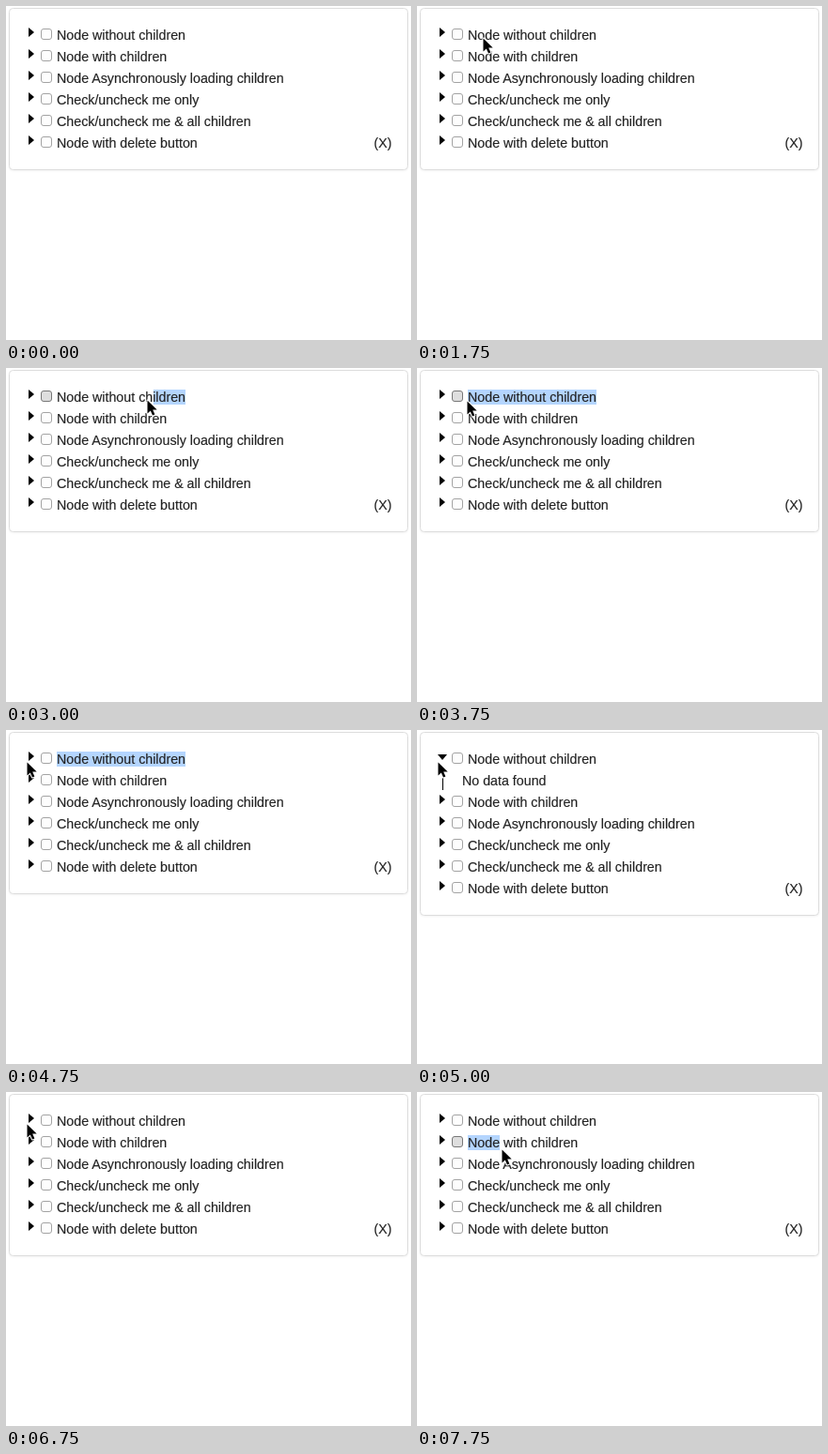
These frames come from a looping animation (431x356 px, 8000 ms). An HTML page:

```html
<!DOCTYPE html>
<html lang="en">
<head>
<meta charset="utf-8">
<title>Tree view</title>
<style>
  html, body { margin: 0; width: 100%; height: 100%; overflow: hidden; background: #fff; }
  svg { display: block; width: 431px; height: 356px; }
  text {
    font: 14.25px "Liberation Sans", Arial, sans-serif;
    fill: #222; stroke: #222; stroke-width: .15; white-space: pre;
  }
  .panel { fill: #fff; stroke: #ddd; filter: drop-shadow(0 1px 1px rgba(0, 0, 0, .05)); }
  .box { fill: #fdfdfd; stroke: #a3a3a3; }
  .box.pressed { fill: #dedede; stroke: #777; }
  .selection { fill: #b4d5fe; }
  .pointer { stroke: #fff; stroke-width: 2; paint-order: stroke; stroke-linejoin: round; }
</style>
</head>
<body>
<svg id="stage" viewBox="0 0 431 356"></svg>
<script>
const LOOP = 8000, STEP = 250, ROW = 23, TEXT_LEFT = 54;
const labels = [
  'Node without children', 'Node with children', 'Node Asynchronously loading children',
  'Check/uncheck me only', 'Check/uncheck me &amp; all children', 'Node with delete button'
];

// Stops of the pointer: time, x, y
const stops = [
  [1000, 138, 29], [1250, 51, 37], [1500, 51, 37], [1750, 70, 34], [2000, 179, 39],
  [2500, 184, 34], [2750, 193, 33], [3000, 150, 34], [3750, 53, 35], [4000, 53, 35],
  [4750, 22, 34], [6750, 22, 34], [7000, 64, 64], [7500, 55, 62], [7750, 90, 61]
];
const easeOut = u => 1 - (1 - u) ** 2.5;

function pointerAt(t) {
  const next = stops.findIndex(stop => stop[0] > t);
  if (next === 0) return null;
  if (next < 0) return stops.at(-1).slice(1);
  const [t0, x0, y0] = stops[next - 1], [t1, x1, y1] = stops[next];
  const k = easeOut((t - t0) / (t1 - t0));
  return [x0 + (x1 - x0) * k, y0 + (y1 - y0) * k];
}

// The marked text follows the pointer: leftwards in the first row, rightwards in the second
function selection(t) {
  if (t >= 7750) return { row: 1, left: TEXT_LEFT, right: pointerAt(t)[0] - 2 };
  if (t < 3000 || t >= 5000) return null;
  const x = pointerAt(Math.min(t, 3750))[0];
  return { row: 0, left: TEXT_LEFT + (x - 53) * 1.06, right: 191 };
}

function treeRow(label, i, open, pressed) {
  const y = (open && i ? i + 1 : i) * ROW;
  const arrow = open && !i ? 'M22 26H32L27 32Z' : 'M24 23V33L30 28Z';
  return `<g transform="translate(0 ${y})">
    <path d="${arrow}"/>
    <rect class="box ${pressed ? 'pressed' : ''}" x="37.5" y="24.5" width="11" height="11" rx="2.5"/>
    <text x="${TEXT_LEFT}" y="36">${label}</text>
    ${i === 5 ? '<text x="401" y="36" text-anchor="middle">(X)</text>' : ''}
  </g>`;
}

function draw(t) {
  const open = t >= 5000 && t < 6750;
  const dragging = t >= 3000 && t < 4250 || t >= 7750;
  const pointer = pointerAt(t), marked = selection(t);
  return `<rect class="panel" x="3.5" y="2.5" width="424" height="${open ? 195 : 172}" rx="4"/>
    ${marked ? `<rect class="selection" x="${marked.left}" y="${23 + marked.row * ROW}"
      width="${marked.right - marked.left}" height="16"/>` : ''}
    ${labels.map((label, i) => treeRow(label, i, open, dragging && marked.row === i)).join('')}
    ${open ? '<path d="M27 48h1v16h-1z"/><text x="48" y="59">No data found</text>' : ''}
    ${pointer ? `<path class="pointer" transform="translate(${pointer})"
      d="M.5 .5V14.5L3.8 11.5L6 16.5L8.4 15.5L6.2 10.6H10.7Z"/>` : ''}`;
}

const stage = document.getElementById('stage');
let shown = '';
function tick() {
  const t = performance.now() % LOOP;
  const picture = draw(t - t % STEP);
  if (picture !== shown) stage.innerHTML = shown = picture;
  requestAnimationFrame(tick);
}
tick();
</script>
</body>
</html>
```
